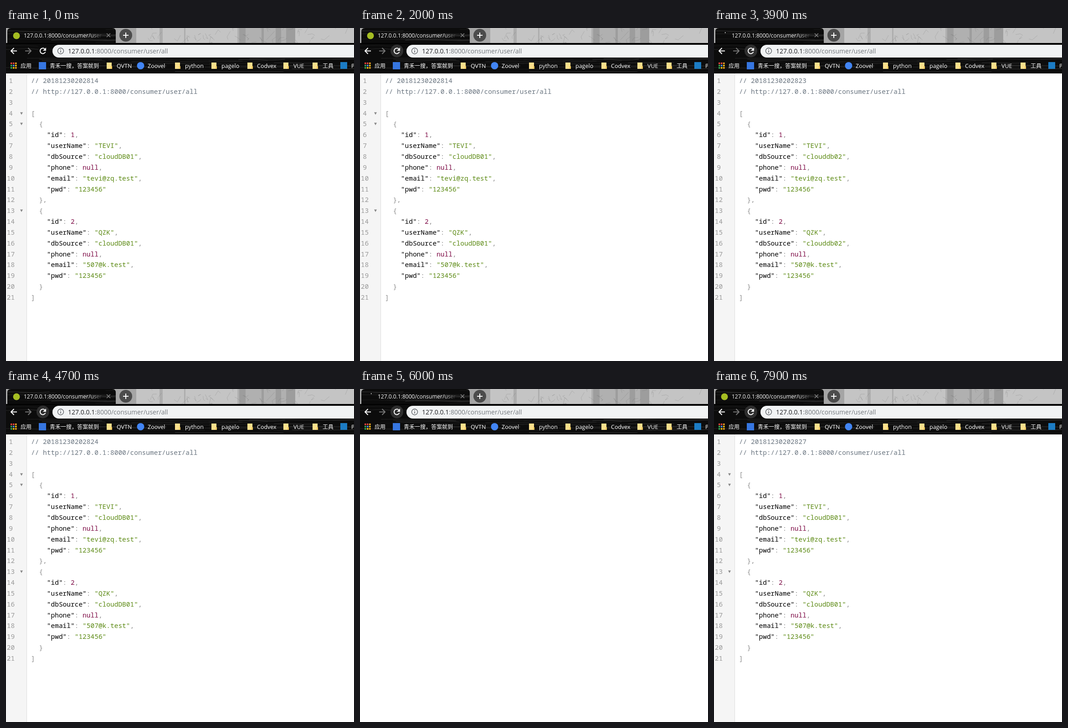
Animation, 764 px wide and 733 px high, one loop 8000 ms. Source, as an HTML page with a canvas:

```html
<!DOCTYPE html>
<html lang="zh">
<head>
<meta charset="utf-8">
<style>
html, body { margin: 0; width: 764px; height: 733px; overflow: hidden; background: #fff; }
canvas { display: block; }
</style>
</head>
<body>
<canvas id="stage" width="764" height="733"></canvas>
<script>
const ctx = document.getElementById('stage').getContext('2d');
const UI = '"Open Sans", "Noto Sans CJK SC", "Noto Sans CJK", sans-serif';
const MONO = '14.5px "Noto Sans Mono", monospace';
const CHAR = 8.7, ROW = 23.85, LEFT = 55, LOOP = 8000;

// Page loads: start time, seconds part of the stamp, data source, fold arrows shown
const loads = [
  [0, 14, 'cloudDB01', true],
  [2400, 22, 'clouddb03', false],
  [3500, 23, 'clouddb02', false],
  [4400, 24, 'cloudDB01', true],
  [6100, 25, 'clouddb03', false],
  [6600, 26, 'clouddb02', false],
  [7500, 27, 'cloudDB01', true]
];
const waits = [[2100, 2400], [3200, 3500], [3900, 4400], [5100, 6100], [6300, 6600], [7200, 7500]];
const within = (t, [from, to]) => t >= from && t < to;

let seed;
function rand(min = 0, max = 1) {
  seed = (seed * 16807) % 2147483647;
  return min + (max - min) * seed / 2147483647;
}

function rect(x, y, w, h, color) {
  ctx.fillStyle = color;
  ctx.fillRect(x, y, w, h);
}
function circle(x, y, r, color) {
  ctx.fillStyle = color;
  ctx.beginPath();
  ctx.arc(x, y, r, 0, 7);
  ctx.fill();
}
function text(s, x, y, color, font, align = 'left') {
  ctx.font = font;
  ctx.fillStyle = color;
  ctx.textAlign = align;
  ctx.fillText(s, x, y);
}
function stroke(d, color, width) {
  ctx.strokeStyle = color;
  ctx.lineWidth = width;
  ctx.stroke(new Path2D(d));
}

function drawForest() {
  rect(0, 0, 286, 33, '#a5a5a5');
  rect(286, 0, 222, 33, '#c4c4c4');
  rect(508, 0, 127, 33, '#b0b0b0');
  rect(635, 0, 129, 33, '#c4c4c4');
  for (const [x, w] of [[337, 7], [391, 3], [512, 14], [561, 5], [592, 12], [615, 20]])
    rect(x, 0, w, 33, 'rgba(80,80,80,.2)');
  for (let i = 0; i < 45; i++) {
    const x = rand(295, 750), y = rand(0, 33);
    stroke(`M${x} ${y}l${rand(-12, 12)} ${rand(-14, 14)}l${rand(-9, 9)} ${rand(-9, 9)}`, 'rgba(90,90,90,.22)', 1);
  }
}

function drawWood() {
  const board = new Path2D('M0 33H3V8Q3 0 11 0H233Q241 0 241 8V33H764V100H0Z');
  ctx.save();
  ctx.clip(board);
  rect(0, 0, 764, 100, '#0c0c0c');
  for (let i = 0; i < 90; i++) {
    const x = rand(-80, 740), y = rand(0, 97), w = rand(60, 260), bend = rand(-3, 3), grey = rand(25, 70) | 0;
    stroke(`M${x} ${y}q${w / 4} ${bend} ${w / 2} 0t${w / 2} ${bend / 2}`, `rgba(${grey},${grey},${grey},.6)`, rand(.6, 2));
  }
  rect(0, 33, 764, 2, '#000');
  rect(0, 98, 764, 2, '#080808');
  ctx.restore();
}

function drawBookmarks() {
  for (let i = 0; i < 9; i++)
    rect(10 + i % 3 * 5, 76 + (i / 3 | 0) * 5, 3.5, 3.5,
      ['#e8453c', '#e8453c', '#f4a825', '#39a852', '#4a8af4', '#f4c20d', '#39a852', '#f4c20d', '#f4a825'][i]);
  rect(72, 75, 16, 16, '#3676e0');
  circle(295.5, 83, 8, '#4285f4');
  rect(734, 75, 15, 15, '#1c7cc4');
  for (const x of [221, 371, 451, 530, 609, 673]) {
    rect(x, 76, 11, 14, '#fbe08c');
    rect(x + 9, 84, 3, 6, '#f0c95c');
  }
  const labels = [['应用', 32], ['青禾一搜，答案就到', 96], ['QVTN', 243], ['Zoovel', 311], ['python', 393],
    ['pagelo', 473], ['Codvex', 551], ['VUE', 631], ['工具', 695], ['P', 758]];
  for (const [label, x] of labels)
    text(label, x, 87.5, '#fff', (/[a-z]/i.test(label) ? 12.5 : 12) + 'px ' + UI);
}

function drawBrowser(t) {
  seed = 4711;
  drawForest();
  drawWood();

  if (waits.some(w => within(t, w))) {
    const turn = (t + 300) % 700 / 700, from = -1.45 + turn * 6.28;
    ctx.strokeStyle = '#ddd';
    ctx.lineWidth = 2;
    ctx.beginPath();
    ctx.arc(23, 17, 7, from, from + .25 + 1.8 * Math.sin(turn * Math.PI));
    ctx.stroke();
  } else circle(23, 17, 7.5, '#a5bd22');

  const fade = ctx.createLinearGradient(185, 0, 212, 0);
  fade.addColorStop(0, '#fff');
  fade.addColorStop(1, 'rgba(255,255,255,0)');
  text('127.0.0.1:8000/consumer/user', 39, 21, fade, '12px ' + UI);
  stroke('M221 12l8 8m0-8l-8 8', '#8c8c8c', 1.3);
  circle(263, 16, 14, '#4c4c4c');
  stroke('M257 16h12m-6-6v12', '#fff', 2);

  if (t >= 1700) circle(81, 50.5, 14, '#2f2f2f');
  stroke('M24 50.5H11m6.5-6.5L11 50.5l6.5 6.5', '#fff', 2);
  stroke('M42 50.5H55m-6.5-6.5l6.5 6.5l-6.5 6.5', '#777', 2);
  stroke('M85 46A6 6 0 1 0 86.5 52.5', '#fff', 2);
  ctx.fillStyle = '#fff';
  ctx.fill(new Path2D('M88 43v7h-7z'));

  ctx.fillStyle = '#f1f3f4';
  ctx.fill(new Path2D('M764 37H116a14 14 0 0 0 0 28H764Z'));
  stroke('M113.5 50.5a6.5 6.5 0 1 0 13 0a6.5 6.5 0 1 0-13 0', '#5f6368', 1.4);
  stroke('M120 49.5v4.5m0-7.5v1.6', '#5f6368', 1.6);
  const font = '14px ' + UI, host = '127.0.0.1';
  text(host, 136, 55.5, '#202124', font);
  text(':8000/consumer/user/all', 136 + ctx.measureText(host).width, 55.5, '#74797e', font);
  drawBookmarks();
}

function record(id, name, email, source) {
  return ['  {', `    "id": ${id},`, `    "userName": "${name}",`, `    "dbSource": "${source}",`,
    '    "phone": null,', `    "email": "${email}",`, '    "pwd": "123456"', id < 2 ? '  },' : '  }'];
}

function tokenColor(token, next) {
  if (token[0] === '"') return next === ':' ? '#000' : '#5c8a14';
  return /null|\d/.test(token) ? '#7d0a45' : '#8c8c8c';
}

function drawPage(t) {
  const [, second, source, arrows] = loads.filter(load => load[0] <= t).pop();
  const lines = ['// 201812302028' + second, '// http://127.0.0.1:8000/consumer/user/all', '', '[',
    ...record(1, 'TEVI', 'tevi@zq.test', source), ...record(2, 'QZK', '507@k.test', source), ']'];

  rect(0, 100, 45, 633, '#f5f5f5');
  rect(45, 100, 1, 633, '#ddd');

  // Selection is dragged from the line end back to the second letter
  if (within(t, [900, 1700])) {
    const start = Math.max(18, 28 - (t - 800) / 40);
    rect(LEFT + start * CHAR, 271, (28 - start) * CHAR, 24, '#d6d3ea');
  }

  lines.forEach((line, i) => {
    const y = Math.round(121 + i * ROW);
    text(i + 1, 10.5, y, '#999', MONO, 'center');
    if (arrows && /[[{]$/.test(line)) {
      ctx.fillStyle = '#888';
      ctx.fill(new Path2D(`M31 ${y - 7.5}h6l-3 5.5z`));
    }
    if (line.startsWith('//')) return text(line, LEFT, y, '#6b7681', MONO);
    for (const { 0: token, index } of line.matchAll(/"[^"]*"|null|\d+|\S/g))
      text(token, LEFT + index * CHAR, y, tokenColor(token, line[index + token.length]), MONO);
  });
}

function frame() {
  const t = Math.floor(performance.now() % LOOP / 100) * 100;
  rect(0, 0, 764, 733, '#fff');
  drawBrowser(t);
  if (!within(t, [5200, 6100])) drawPage(t);
  requestAnimationFrame(frame);
}
frame();
</script>
</body>
</html>
```
